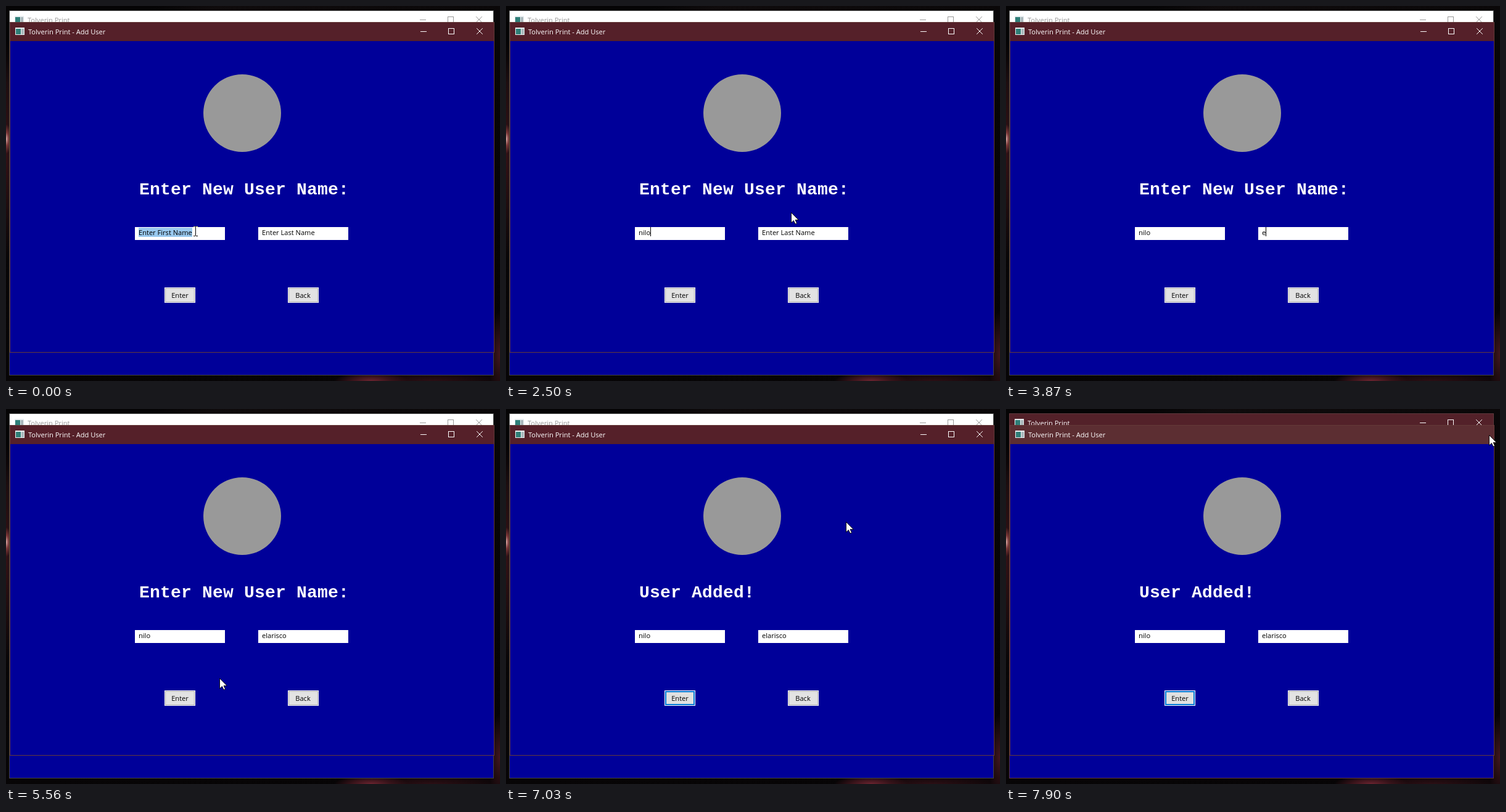
Animation, 801 px wide and 609 px high, one loop 8 s. Source, as an HTML page:

```html
<!DOCTYPE html>
<html lang="en">
<head>
<meta charset="utf-8">
<title>Add User</title>
<style>
html, body { margin: 0; width: 100%; height: 100%; overflow: hidden; background: #050304; }
body { position: relative; font: 11.1px "Open Sans", "Noto Sans", sans-serif; }
svg { position: absolute; left: 0; top: 0; width: 801px; height: 609px; }
.desk {
  position: absolute; left: 0; top: 0; width: 801px; height: 609px;
  background:
    radial-gradient(ellipse 10px 24px at 0 216px, #d8a9a4, #7a3838 45%, transparent),
    radial-gradient(ellipse 14px 180px at 0 235px, #351216, transparent),
    radial-gradient(ellipse 60px 14px at 592px 609px, #6a2430, #3a141b 50%, transparent),
    radial-gradient(ellipse 130px 16px at 690px 609px, #2c0f15, transparent),
    radial-gradient(ellipse 20px 70px at 801px 565px, #43181f, transparent),
    linear-gradient(160deg, #050405 10%, #0f0b0c 14%, #080607 40%, #060405);
}
.field {
  position: absolute; top: 359px; width: 140px; height: 21px; padding-left: 6px;
  background: #fff; color: #000; line-height: 17px; white-space: pre; overflow: hidden;
}
mark { background: #99c9ef; color: #000; }
.caret { display: inline-block; width: 1px; height: 15px; margin-right: -1px; background: #000; vertical-align: top; }
.head { font: bold 28px "Liberation Mono", monospace; letter-spacing: .2px; white-space: pre; fill: #fff; }
.crisp { shape-rendering: crispEdges; }
.ctl { fill: none; stroke: currentColor; }
#beam { mix-blend-mode: difference; }
</style>
</head>
<body>
<div class="desk"></div>
<svg viewBox="0 0 801 609">
  <defs>
    <g id="icon" class="crisp">
      <rect width="15" height="12" fill="#e9eef0"/>
      <rect x="1" y="2" width="8" height="9" fill="#2f7f78"/>
      <rect x="10" y="2" width="4" height="9" fill="#a9b7bb"/>
    </g>
    <path id="minmax" class="ctl crisp" d="M0 5.5H10M45.5 .5H54.5V9.5H45.5Z"/>
    <path id="cross" class="ctl" stroke-linecap="square" d="M91.5 .5L100.5 9.5M100.5 .5L91.5 9.5"/>
  </defs>

  <rect id="backEdge" x="5" y="7" width="786" height="593"/>
  <rect x="6" y="8" width="784" height="591" fill="#000099"/>
  <rect id="backBar" x="6" y="8" width="784" height="20"/>
  <g id="backInk">
    <use href="#icon" x="14" y="16"/>
    <text x="35" y="27" fill="currentColor">Tolverin Print</text>
    <use href="#minmax" x="671" y="17"/>
    <use href="#cross" x="671" y="17"/>
  </g>

  <rect x="6" y="26" width="786" height="537" fill="#643a38"/>
  <rect x="7" y="57" width="784" height="505" fill="#000099"/>
  <rect id="bar" x="7" y="27" width="784" height="30"/>
  <rect id="closeHot" x="745" y="27" width="46" height="30" fill="#e81123"/>
  <use href="#icon" x="15" y="35"/>
  <text x="36" y="46" fill="#fff">Tolverin Print - Add User</text>
  <g id="ctls" color="#fff">
    <use href="#minmax" x="672" y="36"/>
    <use href="#cross" x="672" y="36"/>
  </g>

  <circle cx="383" cy="174" r="63" fill="#999"/>
  <text id="head" class="head" x="216" y="306"></text>

  <g class="crisp">
    <rect x="257" y="457" width="50" height="25" fill="#fff"/>
    <rect id="enter" x="259" y="459" width="46" height="21"/>
    <rect x="457" y="457" width="50" height="25" fill="#fff"/>
    <rect x="458.5" y="458.5" width="47" height="22" fill="#e3e3e3" stroke="#adadad"/>
  </g>
  <g text-anchor="middle">
    <text x="282" y="474">Enter</text>
    <text x="481.5" y="474">Back</text>
  </g>
</svg>
<div class="field" id="first" style="left:209px"></div>
<div class="field" id="last" style="left:409px"></div>
<svg id="beam" viewBox="0 0 801 609">
  <path class="crisp" fill="none" stroke="#fff" d="M-3 -7.5H0M1 -7.5H4M.5 -7V7M-3 7.5H0M1 7.5H4"/>
</svg>
<svg viewBox="0 0 801 609">
  <circle id="ring" r="9" fill="none" stroke="#f4f0d0"/>
  <path id="arrow" fill="#fff" stroke="#000" stroke-width=".9" d="M.5 .5V17L4.4 13.4L7 19L9.6 17.9L7.1 12.4H12.3Z"/>
</svg>

<script>
const LOOP = 8000;
const FIRST = "Enter First Name", LAST = "Enter Last Name";
const $ = id => document.getElementById(id);

// Each track holds [start time, ...values] until the next entry.
// Fields: text, start of selection (-1 for none), caret.
const firstTrack = [
  [0, FIRST, 0, 0], [970, "n", -1, 1], [1250, "ni", -1, 1], [1400, "nil", -1, 1],
  [1680, "nilo", -1, 1], [2100, "nilo", -1, 0], [2380, "nilo", -1, 1], [2650, "nilo", -1, 0]
];
const lastTrack = [
  [0, LAST, -1, 0], [2790, LAST, 13, 0], [2940, LAST, 6, 0], [3070, LAST, 0, 0],
  [3870, "e", -1, 1], [4020, "ela", -1, 1], [4300, "elar", -1, 1], [4440, "elari", -1, 1],
  [4590, "elaris", -1, 1], [4730, "elarisco", -1, 1], [5290, "elarisco", -1, 0]
];
const mouseTrack = [
  [0, "beam", 307, 366], [970, "", 0, 0],
  [2380, "arrow", 376, 338], [2500, "arrow", 462, 335],
  [2650, "beam ring", 521, 367], [2790, "beam ring", 506, 368], [2940, "beam ring", 448, 373],
  [3070, "beam ring", 388, 377], [3190, "beam ring", 387, 377], [3310, "arrow", 386, 376],
  [3870, "", 0, 0],
  [5290, "arrow", 386, 378], [5410, "arrow", 376, 396], [5560, "arrow", 346, 437],
  [5680, "arrow", 307, 459], [5830, "arrow", 286, 467], [5950, "arrow ring", 284, 468],
  [6250, "arrow", 284, 468], [6370, "arrow", 290, 460], [6490, "arrow", 322, 420],
  [6640, "arrow", 390, 342], [6780, "arrow", 456, 270], [6910, "arrow", 507, 222],
  [7030, "arrow", 551, 183], [7180, "arrow", 648, 112], [7300, "arrow", 740, 52],
  [7450, "arrow", 774, 43], [7600, "arrow", 783, 42]
];
// Fill, border colour, border width.
const buttonTrack = [
  [0, "#e3e3e3", "#adadad", 1], [5830, "#e5f1fb", "#0078d7", 1], [5950, "#cce4f7", "#005499", 1],
  [6100, "#e5f1fb", "#0078d7", 2], [6490, "#e1e1e1", "#0078d7", 2]
];

const at = (track, t) => track.findLast(k => k[0] <= t).slice(1);
const show = (id, on) => $(id).style.display = on ? "" : "none";
const attrs = (el, map) => Object.entries(map).forEach(([k, v]) => el.setAttribute(k, v));

function setField(id, [text, from, caret]) {
  const html = (from < 0 ? text : `${text.slice(0, from)}<mark>${text.slice(from)}</mark>`)
    + (caret ? '<span class="caret"></span>' : "");
  const el = $(id);
  if (el.dataset.html !== html) el.innerHTML = el.dataset.html = html;
}

function setMouse([kind, x, y]) {
  const place = `translate(${x} ${y})`;
  for (const id of ["beam", "ring", "arrow"]) show(id, kind.includes(id));
  for (const el of [$("beam").firstElementChild, $("ring"), $("arrow")]) el.setAttribute("transform", place);
}

function draw(t) {
  setField("first", at(firstTrack, t));
  setField("last", at(lastTrack, t));
  setMouse(at(mouseTrack, t));

  const [fill, stroke, width] = at(buttonTrack, t);
  const edge = 258 + width / 2;
  attrs($("enter"), {
    fill, stroke, "stroke-width": width,
    x: edge, y: edge + 200, width: 48 - width, height: 23 - width
  });
  $("head").textContent = t < 6100 ? "Enter New User Name:" : "User Added!";

  const closing = t >= 7900;
  attrs($("backEdge"), { fill: closing ? "#5e383c" : "#434343" });
  attrs($("backBar"), { fill: closing ? "#532129" : "#fff" });
  attrs($("backInk"), { color: closing ? "#fff" : "#999" });
  attrs($("bar"), { fill: closing ? "#5c2e32" : "#552029" });
  show("ctls", !closing);
  show("closeHot", t >= 7450 && !closing);
}

function tick() {
  draw(performance.now() % LOOP);
  requestAnimationFrame(tick);
}
tick();
</script>
</body>
</html>
```
